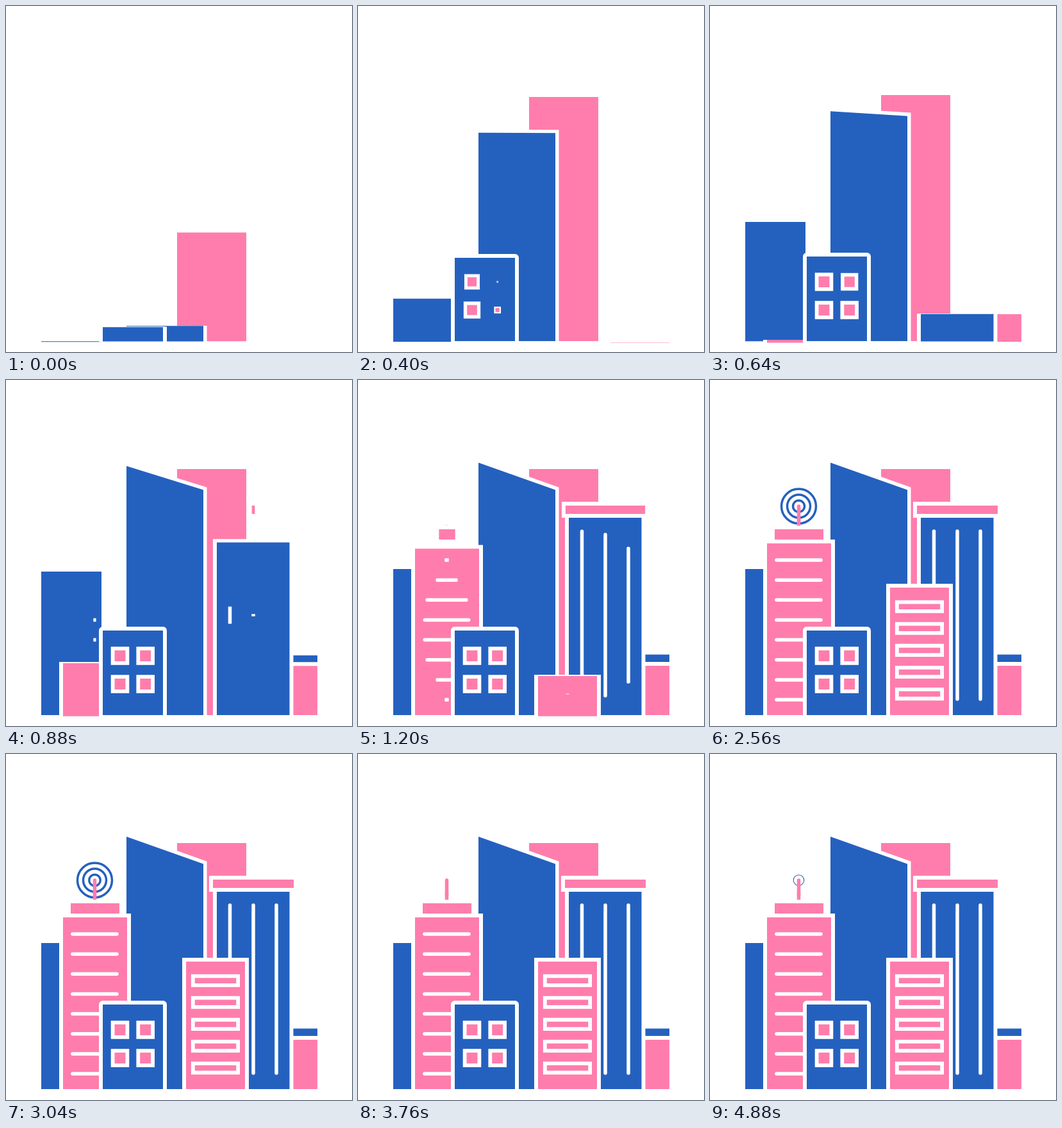
These frames come from a looping animation (540x540 px, 4960 ms). An HTML page with a canvas:

```html
<!DOCTYPE html>
<html>
<head>
<meta charset="utf-8">
<style>
  html, body { margin: 0; width: 100%; height: 100%; overflow: hidden; background: #fff; }
  canvas { display: block; }
</style>
</head>
<body>
<canvas id="stage" width="540" height="540"></canvas>
<script>
const ctx = document.getElementById('stage').getContext('2d');
const BLUE = '#2461bf', PINK = '#ff7dac', WHITE = '#fff';
const LOOP = 4960, GROUND = 523;
let now = 0;

// Quartic ease-in-out progress of a move
function ease(start, duration = 600) {
  const x = Math.min(1, Math.max(0, (now - start) / duration));
  return x < 0.5 ? 8 * x ** 4 : 1 - 8 * (1 - x) ** 4;
}

// Draws with a scale about the point (cx, cy)
function scaled(cx, cy, sx, sy, draw) {
  if (sx < 0.002 || sy < 0.002) return;
  ctx.save();
  ctx.translate(cx, cy);
  ctx.scale(sx, sy);
  ctx.translate(-cx, -cy);
  draw();
  ctx.restore();
}

// Filled polygon with a white margin around it
function shape(color, points, margin = 6, join = 'miter') {
  ctx.beginPath();
  points.forEach(([x, y]) => ctx.lineTo(x, y));
  ctx.closePath();
  if (margin) {
    ctx.lineJoin = join;
    ctx.lineWidth = margin * 2;
    ctx.strokeStyle = WHITE;
    ctx.stroke();
  }
  ctx.fillStyle = color;
  ctx.fill();
}

function box(color, left, top, right, bottom, margin, join) {
  shape(color, [[left, top], [right, top], [right, bottom], [left, bottom]], margin, join);
}

function building(color, left, top, right, start, duration, margin, pivot = 523.5, join) {
  scaled(left, pivot, 1, ease(start, duration),
    () => box(color, left, top, right, GROUND, margin, join));
}

function line(color, x1, y1, x2, y2) {
  ctx.beginPath();
  ctx.moveTo(x1, y1);
  ctx.lineTo(x2, y2);
  ctx.lineCap = 'round';
  ctx.lineWidth = 5.5;
  ctx.strokeStyle = color;
  ctx.stroke();
}

// White-framed pane that pops out of its centre
function pane(cx, cy, width, height, start) {
  const s = ease(start);
  scaled(cx, cy, s, s, () => box(PINK, cx - width / 2, cy - height / 2,
    cx + width / 2, cy + height / 2, 5.8));
}

function roof(left, top, right, bottom, start) {
  scaled((left + right) / 2, top, ease(start), 1, () => box(PINK, left, top, right, bottom));
}

function tower() {
  const left = 171 - 42 * ease(300, 900);
  scaled(188, 523.5, 1, ease(-317, 1044), () =>
    shape(BLUE, [[188, left], [308, 171.5], [308, GROUND], [188, GROUND]], 5.5));
}

function rightBlock() {
  building(BLUE, 394, 428.5, 486, 320, 700, 0);
  building(PINK, 394, 446, 486, 280, 700, 6, 525.5);
  building(BLUE, 329, 214, 442.5, 333, 850);
  [349.5, 386, 422].forEach((x, i) =>
    scaled(x, 367, 1, ease(680 + 80 * i), () => line(WHITE, x, 236, x, 498)));
  roof(323, 196, 449, 209, 724);
}

function leftBlock() {
  building(BLUE, 55, 295, 149, -208, 1390, 0, 524.3);
  building(PINK, 89, 255, 189, 420, 1040, 6, 525.5);
  for (let i = 0; i < 8; i++) {
    const y = 281 + 31.15 * i;
    const order = Math.abs(i - 3.5) - 0.5;
    scaled(138.5, y, ease(707 + 100 * order), 1, () => line(WHITE, 104, y, 173, y));
  }
  roof(101, 233, 177, 249, 930);
}

function signal() {
  const x = 138.5, y = 197;
  [27, 18, 9].forEach((r, i) => {
    const s = ease(1550 + 100 * i) - ease(3100 - 100 * i) + ease(4616 + 100 * i);
    scaled(x, y, s, s, () => {
      ctx.beginPath();
      ctx.arc(x, y, r, 0, Math.PI * 2);
      ctx.lineWidth = 3.5;
      ctx.strokeStyle = BLUE;
      ctx.stroke();
    });
  });
  scaled(x, 227, 1, ease(1100), () => {
    line(PINK, x, y, x, 221);
    box(PINK, x - 2.75, 215, x + 2.75, 227.5, 0);
  });
}

function render(time) {
  now = time % LOOP;
  ctx.fillStyle = WHITE;
  ctx.fillRect(0, 0, 540, 540);

  building(PINK, 267, 139, 375, -573, 1184, 0);
  tower();
  rightBlock();
  leftBlock();
  signal();

  building(BLUE, 151, 391, 245, -369, 971, 6, 523.5, 'round');
  pane(178, 430.5, 17, 17, 26);
  pane(178, 474.5, 17, 17, -10);
  pane(217.7, 430.5, 17, 17, 205);
  pane(217.7, 474.5, 17, 17, 122);

  building(PINK, 281, 324, 373, 800, 900, 6, 525.5);
  for (let i = 0; i < 5; i++) pane(327, 353.7 + 34.1 * i, 64.5, 8.5, 1420 - 100 * i);
}

const begin = performance.now();
function tick() {
  render(performance.now() - begin);
  requestAnimationFrame(tick);
}
tick();
</script>
</body>
</html>
```
